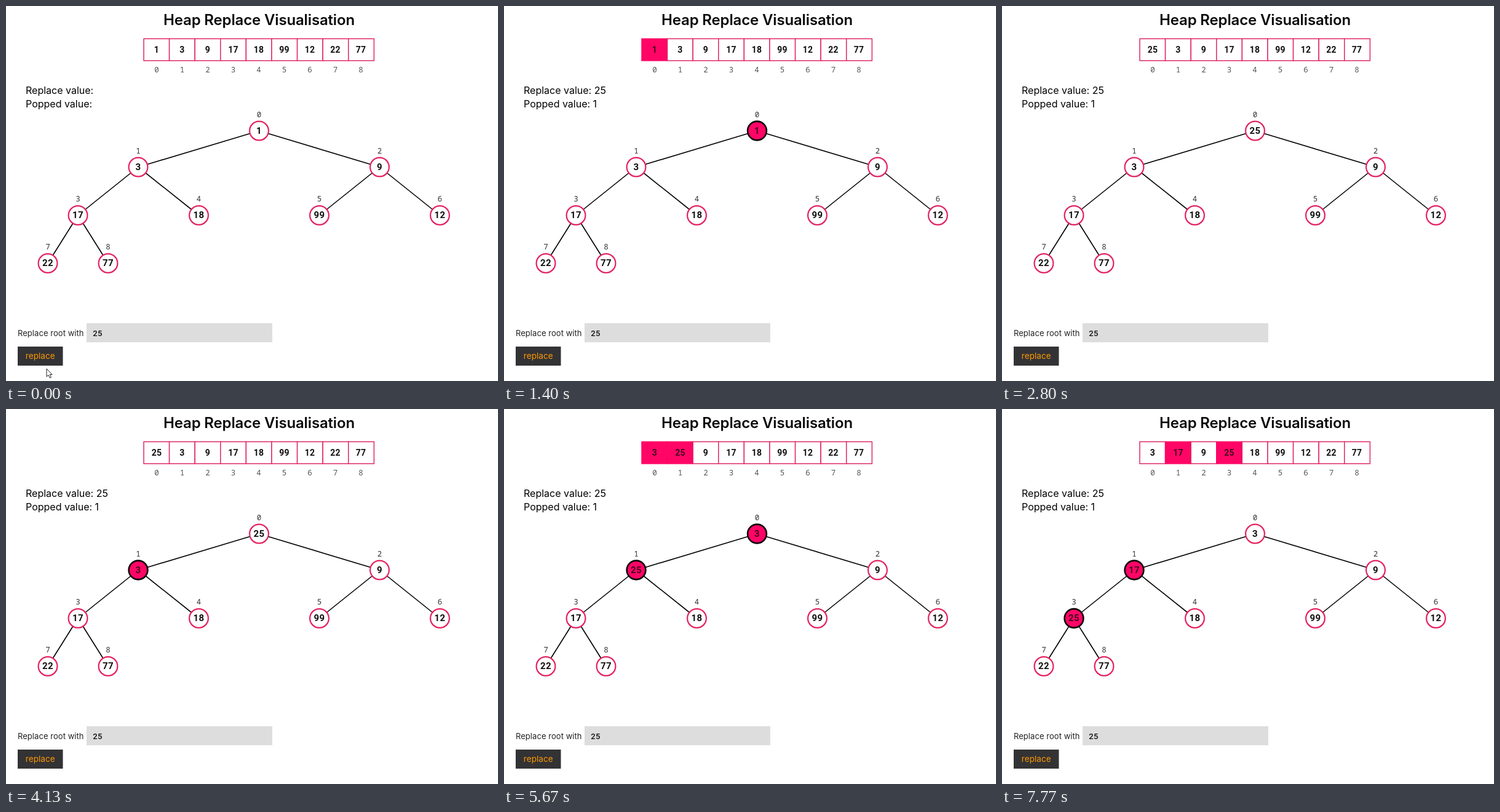
Recreate the animation shown at these times as an HTML page. Size 800 by 610 pixels, loop 8 s.

```html
<!DOCTYPE html>
<html lang="en">
<head>
<meta charset="utf-8">
<title>Heap Replace</title>
<style>
  html, body { margin: 0; width: 100%; height: 100%; overflow: hidden; background: #fff; }
  svg { display: block; width: 800px; height: 610px; font-family: Inter, sans-serif; }
  .num { font-family: Roboto, sans-serif; font-weight: 600; text-anchor: middle; letter-spacing: .3px; fill: #111; }
  .idx { font: 500 12.5px "Noto Sans Mono", monospace; text-anchor: middle; fill: #333; }
  .cell .idx { font-weight: 400; fill: #555; }
  .cell .num { font-size: 14px; }
  .node .num { font-size: 15px; }
  .cell rect { fill: #fff; stroke: #df2a66; stroke-width: 1.5; }
  .node circle { fill: #fff; stroke: #e3235f; stroke-width: 2.2; }
  .on rect { fill: #ff0566; stroke: #ff0566; }
  .on circle { fill: #ff0566; stroke: #0c0408; stroke-width: 2.6; }
  .on .num { fill: #42051e; }
  #edges { stroke: #000; stroke-width: 1.6; }
  .info { font-size: 16px; }
</style>
</head>
<body>
<svg viewBox="0 0 800 610">
  <text x="411.5" y="31" text-anchor="middle" font-size="24" font-weight="600" letter-spacing="-.15" fill="#0a0a0a">Heap Replace Visualisation</text>
  <g id="array"></g>
  <text class="info" x="32" y="143" id="replaced"></text>
  <text class="info" x="32" y="165" id="popped"></text>
  <g id="edges"></g>
  <g id="tree"></g>
  <text x="19" y="536.5" font-size="13" letter-spacing=".05" fill="#222">Replace root with</text>
  <rect x="131" y="516" width="302" height="31" fill="#ddd"/>
  <text class="num" x="149" y="536.5" font-size="13" style="font-weight:500">25</text>
  <rect x="19" y="554" width="73.5" height="31" fill="#333335"/>
  <text x="55.7" y="573.5" text-anchor="middle" font-size="13.6" fill="#ff9800">replace</text>
  <g id="cursor" stroke="#222" stroke-width="1" stroke-linejoin="round" fill="#fff">
    <path id="arrow" d="M0 0V13L3 10.3L5.2 15L7.4 14L5.3 9.5H9Z"/>
    <path id="hand" d="M-1.4 1Q0-.8 1.4 1V6.5L5 7L8 8.2V12L6.3 17H-1.2L-5 11.5Q-4.8 9.2-2.8 10.2L-1.4 11.5Z"/>
  </g>
</svg>
<script>
const LOOP = 8000;
const $ = id => document.getElementById(id);

const nodes = [
  [411.5, 203], [215, 262], [607.5, 262],
  [117, 340.5], [313.5, 340.5], [509.5, 340.5], [705.5, 340.5],
  [68, 418.5], [166, 418.5]
];
const start = [1, 3, 9, 17, 18, 99, 12, 22, 77];

// t: start time, set: value changes by index, cells and tree: highlighted indices
const steps = [
  { t: 0 },
  { t: 700, cells: [0], tree: [0] },
  { t: 1680, set: { 0: 25 }, cells: [0], tree: [0] },
  { t: 2660 },
  { t: 4060, tree: [1] },
  { t: 4620, set: { 0: 3, 1: 25 }, cells: [0, 1], tree: [0, 1] },
  { t: 6510, tree: [3] },
  { t: 7000, set: { 1: 17, 3: 25 }, cells: [1, 3], tree: [1, 3] }
];
let values = start;
for (const s of steps) s.values = values = Object.assign([...values], s.set);

function add(parent, tag, attrs, text = "") {
  const el = document.createElementNS("http://www.w3.org/2000/svg", tag);
  for (const key in attrs) el.setAttribute(key, attrs[key]);
  el.textContent = text;
  return parent.appendChild(el);
}

const cells = start.map((v, i) => {
  const g = add($("array"), "g", { class: "cell" });
  const x = 224 + i * 41.6;
  add(g, "rect", { x, y: 53.3, width: 41.6, height: 35.6 });
  add(g, "text", { class: "idx", x: 245 + i * 41.5, y: 107.5 }, i);
  return { g, label: add(g, "text", { class: "num", x: 245 + i * 41.5, y: 75.5 }) };
});

const tree = nodes.map(([x, y], i) => {
  if (i) {
    const [px, py] = nodes[(i - 1) >> 1];
    add($("edges"), "line", { x1: px, y1: py, x2: x, y2: y });
  }
  const g = add($("tree"), "g", { class: "node" });
  add(g, "circle", { cx: x, cy: y, r: 15.4 });
  add(g, "text", { class: "idx", x, y: y - 22.5 }, i);
  return { g, label: add(g, "text", { class: "num", x, y: y + 4.5 }) };
});

function paint(items, step, lit = []) {
  items.forEach(({ g, label }, i) => {
    g.classList.toggle("on", lit.includes(i));
    label.textContent = step.values[i];
  });
}

function moveCursor(t) {
  const p = Math.min(1, Math.max(0, (t - 35) / 315));
  const ease = p * p * (3 - 2 * p);
  const leaving = t >= 910;
  const x = leaving ? 67 : 66 + 3.5 * ease;
  const y = leaving ? 587 : 590 - 18 * ease;
  const over = y < 584;
  $("cursor").setAttribute("transform", `translate(${x} ${y})`);
  $("cursor").style.display = t < 980 ? "" : "none";
  $("hand").style.display = over ? "" : "none";
  $("arrow").style.display = over ? "none" : "";
}

let current;
function draw(t) {
  const step = steps.findLast(s => t >= s.t);
  if (step !== current) {
    current = step;
    paint(cells, step, step.cells);
    paint(tree, step, step.tree);
    const clicked = step !== steps[0];
    $("replaced").textContent = "Replace value:" + (clicked ? " 25" : "");
    $("popped").textContent = "Popped value:" + (clicked ? " 1" : "");
  }
  moveCursor(t);
}

const begin = performance.now();
function tick() {
  draw((performance.now() - begin) % LOOP);
  requestAnimationFrame(tick);
}
tick();
</script>
</body>
</html>
```
